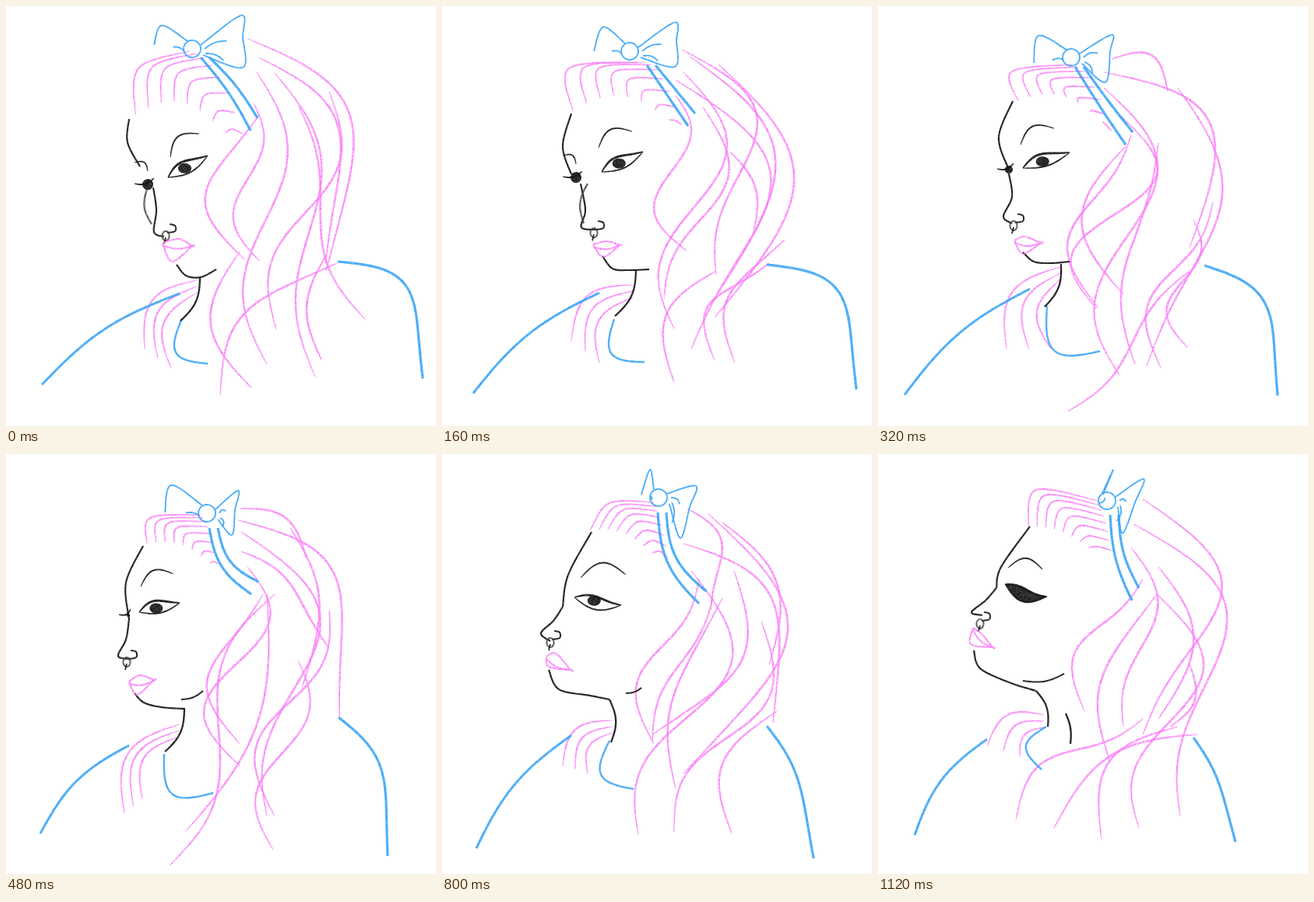
An HTML page with a canvas that plays this animation: 552x539 px, repeating every 1200 ms.

```html
<!DOCTYPE html>
<html lang="en">
<head>
<meta charset="utf-8">
<title>Crayon portrait</title>
<style>
html, body { margin: 0; width: 100%; height: 100%; overflow: hidden; background: #fff; }
canvas { display: block; }
</style>
</head>
<body>
<canvas id="stage" width="552" height="539"></canvas>
<script>
const ctx = document.getElementById('stage').getContext('2d');
const LOOP = 1200, STEP = 80, SAMPLES = 36;

let seed = 7;
const rand = () => (seed = (seed * 16807) % 2147483647) / 2147483647;

// Crayon texture: one colour with uneven coverage.
function crayon(color, low) {
  const tile = document.createElement('canvas'), size = tile.width = tile.height = 96;
  const g = tile.getContext('2d');
  g.fillStyle = color;
  for (let i = 0; i < size * size; i++) {
    g.globalAlpha = low + (1 - low) * rand();
    g.fillRect(i % size, Math.floor(i / size), 1, 1);
  }
  return ctx.createPattern(tile, 'repeat');
}

const pink = crayon('#fa78f8', 0.42);
const blue = crayon('#36a3f6', 0.72);
const black = crayon('#141414', 0.8);
const grey = crayon('#4a443e', 0.6);

const poses = [];
function pose(time) {
  const parts = {};
  poses.push({ time, parts });
  return (name, ...values) => { parts[name] = values; };
}

// Hair strands are x0, y0, x1, y1, bulge, sway.
let p = pose(0);
p('hair', 310,42,411,340,90,12, 324,66,410,330,66,12, 322,85,335,460,6,32, 345,86,397,476,22,28,
  375,127,461,402,-15,14, 415,110,347,415,5,29, 318,125,325,327,-14,21, 325,140,306,325,-55,10,
  425,330,275,500,-45,6, 411,320,405,454,-22,0, 300,315,315,490,-45,0);
p('fringe', 166,140,170,80,235,58, 282,163,290,158,304,164, 28);
p('nape', 245,352,178,440,212,465);
p('knot', 239,55);
p('bow', 190,50,200,25, 302,12,304,40,304,79);
p('band', 250,66,314,160,4);
p('left', 46,486,223,369);
p('right', 426,328,535,478,50);
p('neckline', 225,403,259,459);
p('forehead', 158,145,156,175,172,206);
p('nose', 189,233,193,262,190,290,203,296);
p('cheek', 181,235,187,280);
p('nostril', 213,285);
p('chin', 219,332,231,346,250,348,270,338);
p('neck', 249,348,224,404);
p('brow', 211,194,248,164);
p('eye', 208,220,259,192,8);
p('far', 182,229,7);
p('lips', 201,304,222,299,239,308,213,328);

p = pose(160);
p('hair', 308,56,352,345,65,30, 355,75,350,400,98,8, 300,95,320,440,105,25, 318,65,360,360,90,5,
  310,85,298,414,26,40, 370,187,400,290,18,0, 300,115,314,314,-15,27, 335,130,285,376,35,22,
  420,330,350,455,-38,9, 440,300,376,458,-38,6, 352,340,298,483,-40,0);
p('fringe', 168,135,163,80,252,72, 291,146,299,147,308,152, 25);
p('nape', 245,358,166,430,202,458);
p('knot', 241,58);
p('bow', 195,58,207,27, 299,21,301,45,299,78);
p('band', 263,76,316,154,0);
p('left', 40,497,202,368);
p('right', 417,332,532,492,52);
p('neckline', 221,402,260,457);
p('forehead', 166,138,155,180,166,216);
p('nose', 178,228,184,262,179,284,198,287);
p('cheek', 187,228,182,279);
p('nostril', 203,281);
p('chin', 206,321,219,337,240,339,266,338);
p('neck', 249,339,222,398);
p('brow', 201,182,244,161);
p('eye', 205,213,258,187,8);
p('far', 172,220,7);
p('lips', 194,306,212,302,228,307,207,322);

p = pose(320);
p('hair', 300,68,372,110,30,0, 290,85,400,310,93,5, 290,105,310,474,25,45, 385,105,345,462,64,18,
  310,140,280,388,12,48, 360,175,330,460,-22,10, 325,165,283,388,-45,18, 318,180,315,370,-55,0,
  405,275,397,438,-12,20, 430,250,363,464,-28,18, 400,340,244,520,5,-10);
p('fringe', 180,122,172,84,250,75, 288,148,293,153,300,160, 20);
p('nape', 234,335,165,440,222,440);
p('knot', 248,66);
p('bow', 200,73,206,38, 300,37,298,58,292,98);
p('band', 253,78,318,178,-1);
p('left', 34,499,195,363);
p('right', 419,333,513,500,42);
p('neckline', 217,385,285,443);
p('forehead', 173,122,155,168,167,208);
p('nose', 168,215,172,245,161,270,172,279);
p('nostril', 182,272);
p('chin', 186,316,200,328,222,330,246,328);
p('neck', 235,331,214,386);
p('brow', 183,178,226,157);
p('eye', 186,208,246,188,9);
p('far', 168,210,5);
p('lips', 175,301,188,296,209,304,186,318);

p = pose(480);
p('hair', 300,70,386,135,26,0, 298,85,428,340,74,14, 302,100,335,465,66,39, 302,125,415,250,17,5,
  310,145,300,400,-12,40, 365,95,380,300,30,2, 330,180,300,372,-49,12, 345,180,210,528,-5,-28,
  335,180,230,485,42,0, 415,200,345,465,-25,27, 375,265,343,508,-6,27);
p('fringe', 181,115,185,82,250,78, 262,140,267,138,272,141, 12);
p('nape', 222,347,152,461,175,443);
p('knot', 258,76);
p('bow', 204,75,212,40, 298,47,294,72,290,104);
p('band', 261,95,315,180,-13);
p('left', 44,487,158,374);
p('right', 427,338,490,516,28);
p('neckline', 203,385,266,435);
p('forehead', 176,118,154,165,158,212);
p('nose', 158,212,154,238,144,259,158,263);
p('nostril', 163,257);
p('chin', 165,307,177,319,200,325,230,327);
p('neck', 229,328,204,382);
p('jaw', 225,315,253,304);
p('brow', 173,170,215,154);
p('eye', 171,203,223,191,9);
p('far', 157,207,2);
p('lips', 158,292,172,284,190,290,168,309);

p = pose(640);
p('hair', 312,78,408,115,30,-3, 316,92,405,365,74,45, 310,130,325,400,34,46, 300,118,408,200,24,0,
  385,105,310,468,82,6, 350,205,315,390,-25,4, 330,150,275,348,-18,19, 355,180,258,495,12,37,
  430,345,285,496,-52,6, 400,385,375,485,-28,0, 345,180,280,399,-18,28);
p('fringe', 189,105,200,58,275,72, 276,137,280,138,284,144, 10);
p('nape', 214,352,160,438,173,430);
p('knot', 265,63);
p('bow', 239,52,247,26, 316,53,310,75,300,107);
p('band', 272,88,325,182,-12);
p('left', 55,482,185,363);
p('right', 427,348,481,508,20);
p('neckline', 208,382,252,436);
p('forehead', 190,107,165,155,156,212);
p('nose', 156,212,147,232,135,244,148,252);
p('nostril', 155,245);
p('chin', 151,293,160,311,185,317,226,318);
p('neck', 221,318,207,382);
p('jaw', 243,301,261,295);
p('brow', 178,165,232,156);
p('eye', 173,192,235,189,8);
p('lips', 143,273,157,269,176,282,153,293);

p = pose(800);
p('hair', 315,70,345,200,30,8, 342,77,310,410,112,15, 310,115,425,345,68,8, 320,150,252,488,42,42,
  360,88,420,270,42,0, 410,215,298,485,22,30, 330,160,272,372,-30,18, 348,185,270,370,-8,8,
  360,185,300,430,-30,5, 430,330,372,487,-42,2, 375,150,270,360,58,8);
p('fringe', 190,98,215,63,272,62, 270,127,280,125,290,134, 12);
p('nape', 218,342,155,400,187,410);
p('knot', 278,56);
p('bow', 256,52,267,20, 326,41,318,68,306,108);
p('band', 277,75,330,192,-15);
p('left', 44,506,166,361);
p('right', 417,349,477,519,14);
p('neckline', 215,368,246,430);
p('forehead', 192,100,162,155,155,196);
p('nose', 155,196,143,214,127,230,139,240);
p('nostril', 147,232);
p('chin', 137,277,150,302,190,310,215,315);
p('neck', 215,315,217,370);
p('jaw', 236,307,256,300);
p('brow', 178,159,236,155);
p('eye', 170,184,230,194,5);
p('lips', 134,260,146,256,165,277,137,273);

p = pose(1120);
p('hair', 340,58,340,360,90,26, 328,90,388,465,78,38, 325,120,315,350,25,18, 360,145,360,340,45,2,
  358,180,335,480,38,38, 400,270,375,350,20,0, 340,160,265,330,-34,14, 358,180,298,395,-38,5,
  410,360,226,480,-38,0, 385,350,287,495,-48,0, 340,340,177,470,-28,14);
p('fringe', 193,93,203,46,282,60, 270,120,283,119,300,124, 8);
p('nape', 213,335,140,375,182,388);
p('knot', 294,60);
p('bow', 289,52,302,20, 341,32,330,62,314,102);
p('band', 298,78,326,188,-7);
p('left', 47,489,140,366);
p('right', 405,364,459,498,8);
p('neckline', 216,350,210,405);
p('forehead', 195,93,158,145,152,172);
p('nose', 152,172,138,188,120,203,134,207);
p('nostril', 139,208);
p('chin', 123,252,131,275,168,293,203,304);
p('neck', 203,304,218,350);
p('jaw', 186,291,239,282);
p('throat', 241,333,247,372);
p('brow', 167,146,211,148);
p('eye', 163,167,217,183,1);
p('lips', 122,223,134,232,147,248,119,244);

const lerp = (a, b, k) => a + (b - a) * k;
const mix = (a, b, k) => a.map((v, i) => lerp(v, b[i], k));

function blend(a, b, k) {
  const out = {};
  for (const name of Object.keys({ ...a, ...b })) {
    if (a[name] && b[name]) out[name] = mix(a[name], b[name], k);
    else out[name] = k < 0.5 ? a[name] : b[name];
  }
  return out;
}

// Line with a bulge and an S-shaped sway; positive is right when heading down.
function wave(x0, y0, x1, y1, bulge = 0, sway = 0) {
  const dx = x1 - x0, dy = y1 - y0, len = Math.hypot(dx, dy) || 1;
  return Array.from({ length: SAMPLES }, (_, i) => {
    const u = i / (SAMPLES - 1);
    const off = bulge * Math.sin(Math.PI * u) + sway * Math.sin(2 * Math.PI * u);
    return [x0 + dx * u + dy / len * off, y0 + dy * u - dx / len * off];
  });
}

// Wave whose bulge is a share of its length.
const arc = ([x0, y0, x1, y1], share) =>
  wave(x0, y0, x1, y1, share * Math.hypot(x1 - x0, y1 - y0));

// Catmull-Rom curve through flat coordinates.
function curve(v) {
  const n = v.length / 2;
  const at = (i, k) => v[2 * Math.max(0, Math.min(n - 1, i)) + k];
  return Array.from({ length: SAMPLES }, (_, s) => {
    const u = s / (SAMPLES - 1) * (n - 1);
    const i = Math.min(n - 2, Math.floor(u)), t = u - i;
    return [0, 1].map(k => {
      const a = at(i - 1, k), b = at(i, k), c = at(i + 1, k), d = at(i + 2, k);
      return b + 0.5 * t * (c - a + t * (2 * a - 5 * b + 4 * c - d + t * (3 * (b - c) + d - a)));
    });
  });
}

const oval = (x, y, rx, ry) => Array.from({ length: SAMPLES }, (_, i) => {
  const a = 2 * Math.PI * i / (SAMPLES - 1);
  return [x + rx * Math.cos(a), y + ry * Math.sin(a)];
});

function fill(pts, ink) {
  ctx.fillStyle = ink;
  ctx.beginPath();
  for (const [x, y] of pts) ctx.lineTo(x, y);
  ctx.fill();
}

function line(pts, ink, width, taper) {
  const left = [], right = [], last = pts.length - 1;
  pts.forEach(([x, y], i) => {
    const a = pts[Math.max(0, i - 1)], b = pts[Math.min(last, i + 1)];
    const dx = b[0] - a[0], dy = b[1] - a[1], len = Math.hypot(dx, dy) || 1;
    const swell = taper ? 0.4 + 0.6 * Math.sqrt(Math.abs(Math.sin(Math.PI * i / last))) : 1;
    const r = width * swell / 2;
    left.push([x - dy / len * r, y + dx / len * r]);
    right.unshift([x + dy / len * r, y - dx / len * r]);
  });
  fill(left.concat(right), ink);
}

function drawHair({ hair, fringe, nape }) {
  for (let i = 0; i < hair.length; i += 6) line(wave(...hair.slice(i, i + 6)), pink, 2.8, true);

  const lift = fringe[12], first = fringe.slice(0, 6), last = fringe.slice(6, 12);
  for (let i = 0; i < 8; i++) {
    const k = i / 7, up = lift * Math.sin(Math.PI * k);
    line(curve(mix(first, last, k).map((v, j) => j % 2 ? v - up : v)), pink, 2.2, true);
  }

  const [x, y, ax, ay, bx, by] = nape;
  for (let i = 0; i < 3; i++) {
    line(arc([x, y + 8 * i, lerp(ax, bx, i / 2), lerp(ay, by, i / 2)], -0.27), pink, 2.4, true);
  }
}

function drawClothes({ left, right, neckline, band, bow, knot }) {
  line(wave(...left, 15), blue, 3);
  line(wave(...right, right[4] / 6), blue, 3.2);
  line(arc(neckline, -0.42), blue, 2.4);

  const [x0, y0, x1, y1, bulge] = band;
  line(wave(x0, y0, x1, y1, bulge), blue, 3.2);
  line(wave(x0 + 11, y0, x1 + 9, y1 - 16, bulge), blue, 3.2);

  const [x, y] = knot;
  const toward = (i, k) => [lerp(x, bow[i], k), lerp(y, bow[i + 1], k)];
  line(oval(x, y, 11, 11), blue, 1.9);
  line(curve([...bow.slice(0, 4), x - 6, y - 10]), blue, 1.9);
  line(curve([x + 11, y - 5, ...bow.slice(4), x + 14, y + 8]), blue, 1.9);
  line(wave(...toward(0, 0.5), x - 10, y + 3, 2), blue, 1.9);
  line(wave(x + 16, y, ...toward(6, 0.68), 3), blue, 1.9);
  line(wave(x + 17, y + 6, ...toward(8, 0.62), 3), blue, 1.9);
}

function drawEyes({ brow, eye, far }, closed) {
  line(arc(brow, 0.3), black, 2, true);
  const [x0, y0, x1, y1, up] = eye;
  const upper = wave(x0, y0, x1, y1, up, 2), lower = wave(x0, y0, x1, y1, up - 16);
  if (closed) fill(upper.concat(lower.slice().reverse()), black);
  else fill(oval(lerp(x0, x1, 0.42), lerp(y0, y1, 0.42), 8.5, 6.5), black);
  line(upper, black, 3, true);
  line(lower, black, 2, true);

  if (!far) return;
  const [x, y, r] = far;
  fill(oval(x, y, r, r), black);
  line(wave(x - 17 + (7 - r), y - 1, x + 8 - (7 - r), y - 8, -4), black, 2.2, true);
  if (r > 5) line(wave(x - 17, y - 28, x, y - 17, 7), black, 1.8, true);
}

function drawFace(f) {
  for (const name of ['forehead', 'nose', 'chin']) line(curve(f[name]), black, 2.2);
  line(arc(f.neck, 0.13), black, 2.3);
  if (f.cheek) line(arc(f.cheek, -0.14), grey, 2.4);
  if (f.jaw) line(arc(f.jaw, -0.1), black, 2);
  if (f.throat) line(arc(f.throat, 0.08), black, 2.4);

  const [x, y] = f.nostril;
  line(curve([x - 3, y - 5, x + 4, y - 3, x + 4, y + 4, x - 6, y + 6]), black, 2);
  line(oval(x - 8, y + 10, 4.5, 6), grey, 2.1);
  line(wave(x - 8, y + 12, x - 10, y + 20), black, 1.8);

  const [ax, ay, bx, by, cx, cy, dx, dy] = f.lips;
  line(curve([ax, ay, bx, by, cx, cy, cx, cy, dx, dy, ax, ay]), pink, 2.2);
  line(wave(ax, ay + 3, cx, cy, -4), pink, 2.2);
}

function draw(time) {
  const t = Math.floor((time % LOOP) / STEP) * STEP;
  let i = 0;
  while (i < poses.length - 2 && poses[i + 1].time <= t) i++;
  const a = poses[i], b = poses[i + 1];
  const now = blend(a.parts, b.parts, (t - a.time) / (b.time - a.time));

  ctx.fillStyle = '#fff';
  ctx.fillRect(0, 0, 552, 539);
  drawHair(now);
  drawClothes(now);
  drawFace(now);
  drawEyes(now, now.eye[4] < 3);
}

const start = performance.now();
function tick() {
  draw(performance.now() - start);
  requestAnimationFrame(tick);
}
tick();
</script>
</body>
</html>
```
